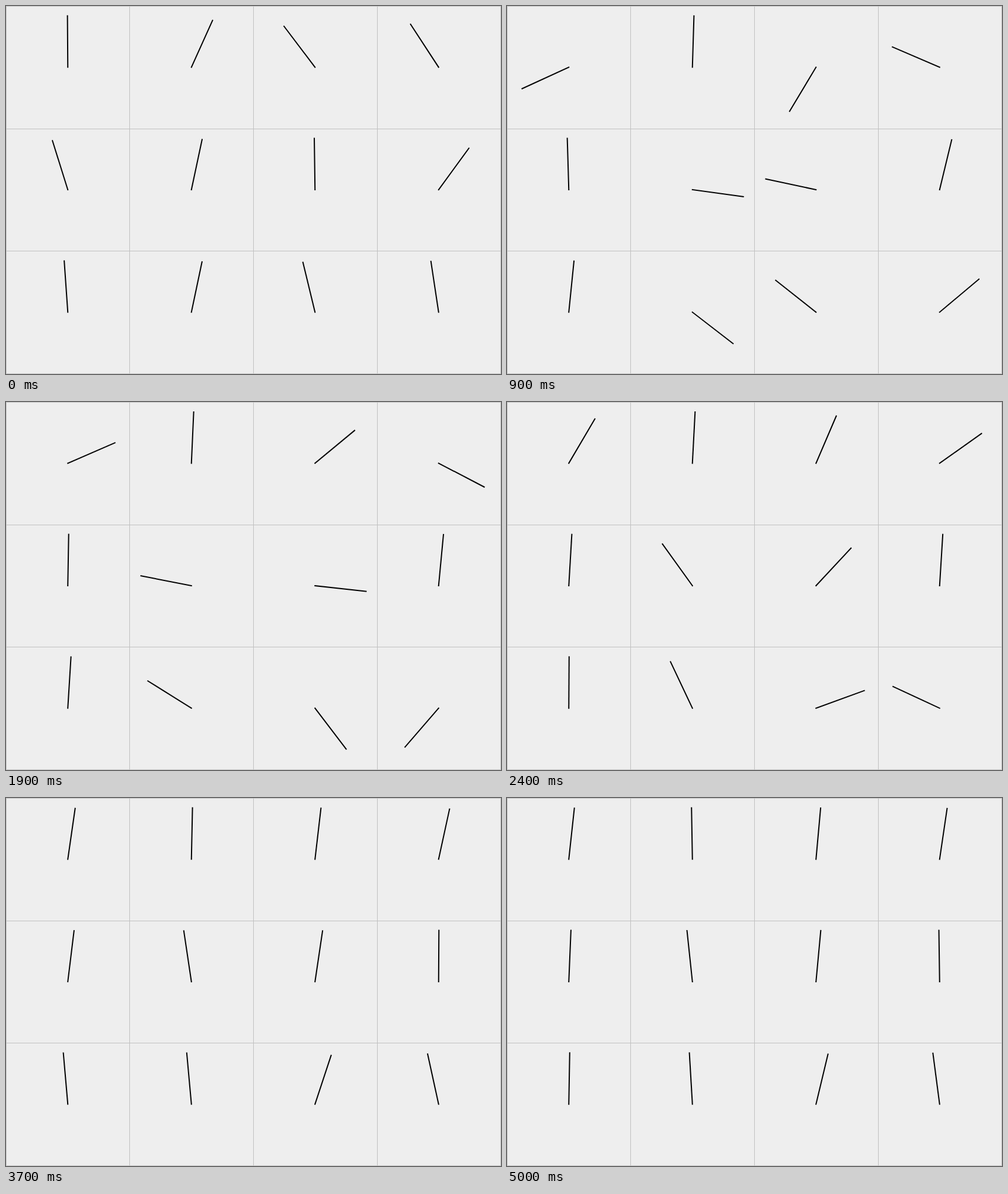
An HTML page that plays this animation: 843 px wide and 627 px high, repeating every 5.1 s.

```html
<!DOCTYPE html>
<html lang="en">
<head>
<meta charset="utf-8">
<title>Needles</title>
<style>
  html, body { margin: 0; width: 100%; height: 100%; overflow: hidden; background: #eee; }
  svg { display: block; }
  .grid { fill: none; stroke: #c0c0c0; stroke-width: 1; shape-rendering: crispEdges; }
  .needle { stroke: #000; stroke-width: 2; stroke-linecap: square; }
</style>
</head>
<body>
<svg id="stage" width="843" height="627" viewBox="0 0 843 627"></svg>
<script>
const COLS = 4, ROWS = 3, WIDTH = 842, HEIGHT = 626, LENGTH = 87.5;
const CELL_W = WIDTH / COLS, CELL_H = HEIGHT / ROWS;
const STEP = 100, LOOP = 5100;
const SPIN_RATE = 1.85, SPIN_SETTLE = 0.42;

// Motions return clockwise degrees from upright; times are in seconds.

// Begins at `from` and blends into the given path.
const ease = (from, settle, path) => t =>
  path(t) + (from - path(0)) * Math.exp(-t / settle);

// One turn to `to`, half done at `mid`: the speed follows sin(angle / 2).
const spin = (from, to, mid) => ease(from, SPIN_SETTLE, t =>
  to * 2 / Math.PI * Math.atan(Math.exp(SPIN_RATE * (t - mid))));

// Falls back to `rest` and drifts around it, furthest out at `peak`.
const sway = (from, rest, size, peak, settle) => ease(from, settle, t =>
  rest + size * Math.cos(2 * Math.PI * (t - peak) / (LOOP / 1000)));

const motions = [
  spin(-0.4, -354, 1.2),
  sway(24.3, 1, 2, 2.5, 0.32),
  spin(-37.1, -355, 1.04),
  spin(-33.1, -352, 1.56),
  sway(-17.4, 3, 4, 3.6, 0.28),
  spin(12, 354.2, 1.31),
  spin(-0.8, -355, 1.44),
  sway(36.1, 0, 1, 2.2, 0.9),
  sway(-4, 0.5, 5.5, 1.1, 0.2),
  spin(11.9, 356.8, 1.14),
  spin(-13.6, -347, 1.68),
  spin(-8.6, 353, 1.68)
];

const stage = document.getElementById('stage');

function add(tag, attrs) {
  const el = document.createElementNS('http://www.w3.org/2000/svg', tag);
  for (const key in attrs) el.setAttribute(key, attrs[key]);
  return stage.appendChild(el);
}

const columns = [0, 210, 421, 632, 842].map(x => `M${x + 0.5} 0V${HEIGHT + 1}`);
const rows = [0, 209, 417, 626].map(y => `M0 ${y + 0.5}H${WIDTH + 1}`);
add('path', { class: 'grid', d: columns.concat(rows).join('') });

const needles = motions.map((angleAt, i) => ({
  line: add('line', { class: 'needle', x1: 0, y1: 0, x2: 0, y2: -LENGTH }),
  x: (i % COLS + 0.5) * CELL_W,
  y: (Math.floor(i / COLS) + 0.5) * CELL_H,
  angleAt
}));

function draw(t) {
  for (const { line, x, y, angleAt } of needles) {
    line.setAttribute('transform', `translate(${x} ${y}) rotate(${angleAt(t)})`);
  }
}

const start = performance.now();
function tick() {
  const t = (performance.now() - start) % LOOP;
  draw(Math.floor(t / STEP) * STEP / 1000);
  requestAnimationFrame(tick);
}
tick();
</script>
</body>
</html>
```
